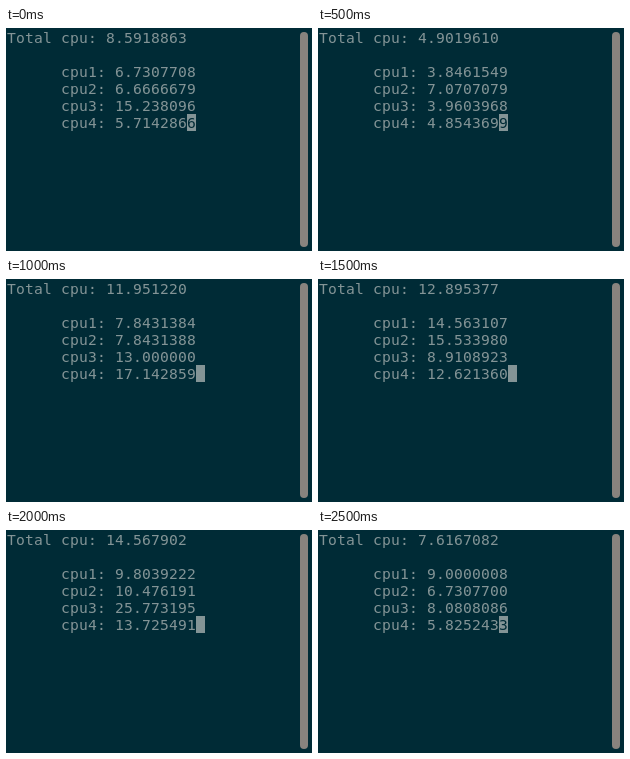
An HTML page with a canvas for the animation above (3000 ms loop, 306 px wide and 223 px high).

```html
<!DOCTYPE html>
<html lang="en">
<head>
<meta charset="utf-8">
<title>CPU monitor</title>
<style>
  html, body { margin: 0; width: 100%; height: 100%; overflow: hidden; background: #002b36; }
  canvas { display: block; }
</style>
</head>
<body>
<canvas id="term" width="306" height="223"></canvas>
<script>
const BG = '#002b36', FG = '#839496', BAR = '#88837e';
const CELL = 9, LINE = 17, LEFT = 1, TOP = 1, ASCENT = 14;
const STEP = 500;

// Readings: total, cpu1..cpu4; the last flag puts the cursor on the final digit
const samples = [
  ['8.5918863', '6.7307708', '6.6666679', '15.238096', '5.7142866', true],
  ['4.9019610', '3.8461549', '7.0707079', '3.9603968', '4.8543699', true],
  ['11.951220', '7.8431384', '7.8431388', '13.000000', '17.142859', false],
  ['12.895377', '14.563107', '15.533980', '8.9108923', '12.621360', false],
  ['14.567902', '9.8039222', '10.476191', '25.773195', '13.725491', false],
  ['7.6167082', '9.0000008', '6.7307700', '8.0808086', '5.8252433', true],
];

const ctx = document.getElementById('term').getContext('2d');
ctx.font = '14.67px "DejaVu Sans Mono", monospace';

function print(text, col, row, color = FG) {
  ctx.fillStyle = color;
  [...text].forEach((ch, i) =>
    ctx.fillText(ch, LEFT + (col + i) * CELL, TOP + row * LINE + ASCENT));
}

function draw([total, ...rest]) {
  const onDigit = rest.pop();
  ctx.fillStyle = BG;
  ctx.fillRect(0, 0, 306, 223);

  print('Total cpu: ' + total, 0, 0);
  rest.forEach((value, i) => print(`cpu${i + 1}: ${value}`, 6, i + 2));

  const col = onDigit ? 20 : 21;
  ctx.fillStyle = FG;
  ctx.fillRect(LEFT + col * CELL, TOP + 5 * LINE, CELL, LINE);
  if (onDigit) print(rest[3].at(-1), col, 5, BG);

  ctx.fillStyle = BAR;
  ctx.beginPath();
  ctx.roundRect(294, 4, 8, 215, 4);
  ctx.fill();
}

let shown = -1;
function tick() {
  const step = Math.floor(performance.now() / STEP) % samples.length;
  if (step !== shown) draw(samples[shown = step]);
  requestAnimationFrame(tick);
}
tick();
</script>
</body>
</html>
```
